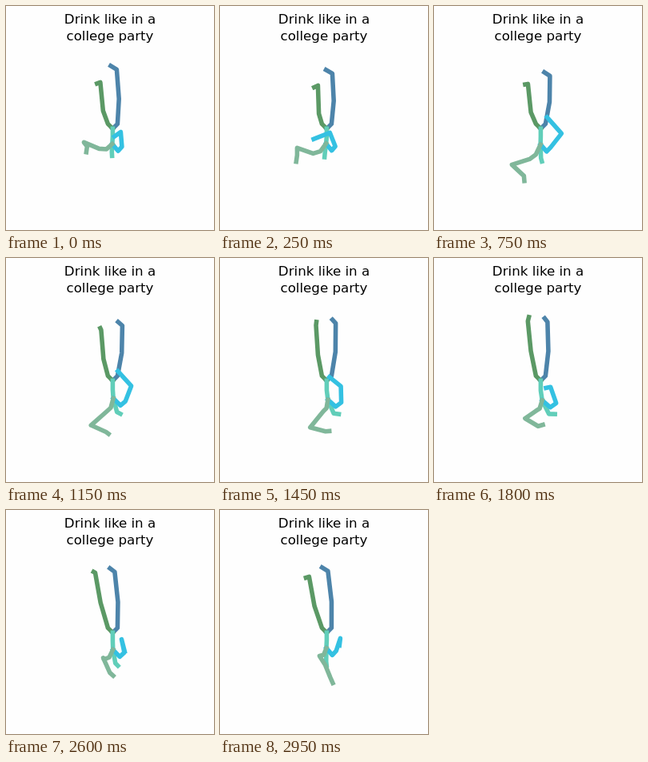
An HTML page that plays this animation: 260 by 280 pixels, repeating every 3000 ms.

```html
<!DOCTYPE html>
<html lang="en">
<head>
<meta charset="utf-8">
<title>Stick figure</title>
<style>
  html, body { margin: 0; width: 100%; height: 100%; overflow: hidden; background: #fefefe; }
  svg { display: block; width: 260px; height: 280px; }
  text { font: 16.67px "DejaVu Sans", sans-serif; text-anchor: middle; fill: #000; }
  polyline { fill: none; stroke-width: 5.56; stroke-linejoin: round; stroke-linecap: square; }
</style>
</head>
<body>
<svg viewBox="0 0 260 280">
  <text x="130" y="22">Drink like in a</text>
  <text x="130" y="43">college party</text>
  <g id="figure" transform="translate(0.4 0.4)"></g>
</svg>
<script>
const LOOP = 3000, STEP = 50;
const root = [133, 153], blueHip = [139, 147], greenHip = [127, 147];

// Key points of the freely moving joints; every other joint follows from them.
const keyTimes = [0, 250, 750, 1500, 2250, 2950];
const keys = {
  blueAnkle:    [[138, 79], [140, 84], [144.5, 87], [144, 81], [137, 78], [134.5, 76]],
  greenAnkle:   [[117.5, 95], [122, 99], [117, 97], [119.5, 83], [112, 75], [111, 83]],
  cyanElbow:    [[143, 157], [137, 158], [159, 159], [150, 160], [140.5, 162], [150, 160]],
  cyanWrist:    [[136, 162], [119, 165], [143, 141], [138, 151], [145.5, 177], [149, 168]],
  sageShoulder: [[116, 178], [116, 184], [119, 191], [129, 191], [121, 190], [124, 182]],
  sageElbow:    [[97, 170], [96, 177], [97, 198], [113, 211], [113.5, 181], [131, 193]],
  sageWrist:    [[101, 175], [96, 186], [112, 212], [132, 216], [124, 200], [137.5, 209]]
};

const figure = document.getElementById("figure");
const limbs = ["#4d84aa", "#5b9965", "#61ceb9", "#34c1e2", "#80b79a"].map(color => {
  const line = document.createElementNS("http://www.w3.org/2000/svg", "polyline");
  line.setAttribute("stroke", color);
  return figure.appendChild(line);
});

const shift = ([x, y], dx, dy) => [x + dx, y + dy];
const mix = (a, b, u) => a.map((v, axis) => v + (b[axis] - v) * u);
const smooth = u => u * u * (3 - 2 * u);

function slope(track, i, axis) {
  const a = Math.max(i - 1, 0), b = Math.min(i + 1, keyTimes.length - 1);
  return (track[b][axis] - track[a][axis]) / (keyTimes[b] - keyTimes[a]);
}

// Cubic Hermite curve through the key points.
function follow(track, time) {
  let i = 0;
  while (i < keyTimes.length - 2 && time >= keyTimes[i + 1]) i++;
  const span = keyTimes[i + 1] - keyTimes[i];
  const u = (time - keyTimes[i]) / span;
  return mix(track[i], track[i + 1], smooth(u)).map((v, axis) =>
    v + span * u * (1 - u) * ((1 - u) * slope(track, i, axis) - u * slope(track, i + 1, axis)));
}

function pose(time) {
  const joint = {};
  for (const name in keys) joint[name] = follow(keys[name], time);
  const { blueAnkle, greenAnkle, cyanElbow, cyanWrist, sageShoulder, sageElbow, sageWrist } = joint;

  // The body turns once per loop; trunk, feet and hand share that turn.
  const turn = Math.cos(2 * Math.PI * (time - 1800) / LOOP);
  const chest = [133.5 + 1.3 * turn, 174.5 + 3 * turn];
  const waist = [133, (root[1] + chest[1]) / 2];
  const neck = shift(chest, 3.5 + 5 * turn, 10 + 7 * smooth(Math.min(1, time / 750)));
  const head = shift(neck, 3.5 + 4 * turn, 2.8 - 2.5 * turn);

  const blueKnee = shift(mix(blueHip, blueAnkle, 0.5), 2.3, 2.7);
  const blueToe = shift(blueAnkle, -5.7 + 2.2 * turn, -4.5);
  const greenKnee = shift(mix(greenHip, greenAnkle, 0.5), -1.3, 2 + 0.4 * (greenAnkle[1] - 76));
  const greenToe = shift(greenAnkle, -1.7 + 3 * turn, -1.5 - 3.7 * turn);

  const cyanShoulder = shift(chest, 14.5 + 3 * turn, 3.5);
  const cyanCollar = shift(mix(chest, cyanShoulder, 0.5), 1.3, 7);
  const cyanHand = mix(cyanElbow, cyanWrist, 1.13);
  const sageCollar = shift(mix(chest, sageShoulder, 0.5), 1, 3.5);
  const sageHand = shift(sageWrist, 1 + 4 * time / LOOP + 2.5 * turn, 3.3 - 5 * turn);

  return [
    [root, blueHip, blueKnee, blueAnkle, blueToe],
    [root, greenHip, greenKnee, greenAnkle, greenToe],
    [root, waist, chest, neck, head],
    [chest, cyanCollar, cyanShoulder, cyanElbow, cyanWrist, cyanHand],
    [chest, sageCollar, sageShoulder, sageElbow, sageWrist, sageHand]
  ];
}

function draw(time) {
  pose(time).forEach((points, i) => limbs[i].setAttribute("points",
    points.map(([x, y]) => x.toFixed(2) + "," + y.toFixed(2)).join(" ")));
}

const start = performance.now();
function tick() {
  const elapsed = (performance.now() - start) % LOOP;
  draw(Math.floor(elapsed / STEP) * STEP);
  requestAnimationFrame(tick);
}
tick();
</script>
</body>
</html>
```
